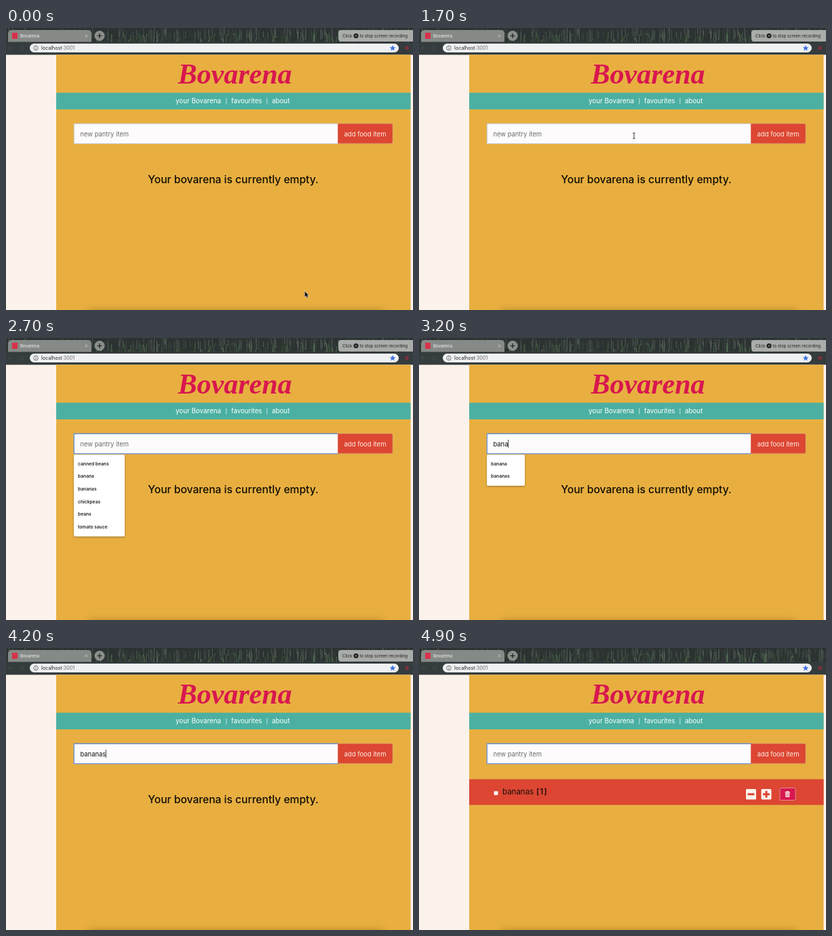
An HTML page with a canvas for the animation above (5000 ms loop, 600 by 416 pixels).

```html
<!DOCTYPE html>
<html lang="en">
<head>
<meta charset="utf-8">
<title>Bovarena</title>
<style>
  html, body { margin: 0; width: 100%; height: 100%; overflow: hidden; }
  canvas { display: block; width: 600px; height: 416px; }
</style>
</head>
<body>
<canvas id="stage"></canvas>
<script>
const W = 600, H = 416, LOOP = 5000, STEP = 100;
const RED = '#dc4632', CRIMSON = '#d8174f', ORANGE = '#e8af40', TEAL = '#4bb0a2', CREAM = '#fcf2ec';
const SANS = 'Inter, sans-serif';

const canvas = document.getElementById('stage');
const ctx = canvas.getContext('2d');
const dpr = window.devicePixelRatio || 1;
canvas.width = W * dpr;
canvas.height = H * dpr;
ctx.scale(dpr, dpr);

// Times at which the value of the input field changes
const typing = [[0, ''], [2800, 'b'], [2900, 'ba'], [3000, 'bana'],
  [3500, 'banan'], [3700, 'banana'], [3900, 'bananas'], [4300, '']];
const history = ['canned beans', 'banana', 'bananas', 'chickpeas', 'beans', 'tomato sauce'];
const FOCUS = 1800, CURSOR_HIDDEN = 2000, LIST_CLOSED = 4000, ADDED = 4300;
const HINT_FADE = 4300, HINT_GONE = 4700;

function rect(x, y, w, h, fill, radius = 0) {
  ctx.fillStyle = fill;
  ctx.beginPath();
  ctx.roundRect(x, y, w, h, radius);
  ctx.fill();
}

function outline(x, y, w, h, color, width = 1, radius = 0) {
  ctx.strokeStyle = color;
  ctx.lineWidth = width;
  ctx.beginPath();
  ctx.roundRect(x, y, w, h, radius);
  ctx.stroke();
}

function disc(x, y, r, fill) {
  ctx.fillStyle = fill;
  ctx.beginPath();
  ctx.arc(x, y, r, 0, 7);
  ctx.fill();
}

function lines(color, width, ...segments) {
  ctx.strokeStyle = color;
  ctx.lineWidth = width;
  ctx.beginPath();
  for (const [x1, y1, x2, y2] of segments) {
    ctx.moveTo(x1, y1);
    ctx.lineTo(x2, y2);
  }
  ctx.stroke();
}

function text(str, x, y, size, color, weight = 400, align = 'left') {
  ctx.font = `${weight} ${size}px ${SANS}`;
  ctx.fillStyle = color;
  ctx.textAlign = align;
  ctx.fillText(str, x, y);
  return ctx.measureText(str).width;
}

function cross(x, y, r, color, width) {
  lines(color, width, [x - r, y - r, x + r, y + r], [x - r, y + r, x + r, y - r]);
}

function withShadow(color, blur, offsetY, paint) {
  ctx.save();
  ctx.shadowColor = color;
  ctx.shadowBlur = blur * dpr;
  ctx.shadowOffsetY = offsetY * dpr;
  paint();
  ctx.restore();
}

function rainyTheme() {
  let seed = 11;
  const rnd = () => (seed = seed * 16807 % 2147483647) / 2147483647;
  rect(0, 0, W, 40, '#2b3231');
  for (let i = 0; i < 190; i++) {
    const x = rnd() * W, y = rnd() * 8 - 2;
    lines(`rgba(150,162,154,${0.1 + rnd() * 0.35})`, 0.9, [x, y, x, y + 8 + rnd() * 12]);
  }
  for (let i = 0; i < 150; i++) {
    const x = rnd() * W, h = 4 + rnd() * 13, lean = (rnd() - 0.5) * 11;
    ctx.strokeStyle = `hsla(${100 + rnd() * 40},${8 + rnd() * 14}%,${18 + rnd() * 26}%,.8)`;
    ctx.lineWidth = 0.7 + rnd();
    ctx.beginPath();
    ctx.moveTo(x, 21);
    ctx.quadraticCurveTo(x, 21 - h, x + lean, 21 - h * 0.8);
    ctx.stroke();
  }
}

function star(x, y, r, color) {
  ctx.fillStyle = color;
  ctx.beginPath();
  for (let i = 0; i < 10; i++) {
    const a = i * Math.PI / 5 - Math.PI / 2, d = i % 2 ? r * 0.45 : r;
    ctx.lineTo(x + d * Math.cos(a), y + d * Math.sin(a));
  }
  ctx.fill();
}

function recordingHint(t) {
  if (t >= HINT_GONE) return;
  ctx.globalAlpha = 1 - Math.max(0, t - HINT_FADE) / (HINT_GONE - HINT_FADE);
  rect(490, 3, 114, 17, '#a9aca9', 4);
  text('Click', 496, 14, 6.2, '#222');
  disc(516, 11.5, 3.6, '#1c1c1c');
  cross(516, 11.5, 1.2, '#c9cbc9', 0.8);
  text('to stop screen recording', 521.5, 14, 6.1, '#222');
  ctx.globalAlpha = 1;
}

function browser(t) {
  rainyTheme();
  rect(3, 3, 123, 18, '#868a87', [5, 5, 0, 0]);
  rect(9, 7, 8, 9, '#d8324a');
  text('Bovarena', 21, 14, 6.3, '#f5f5f5');
  cross(118.5, 11.5, 1.8, '#d0d2d0', 0.8);
  disc(138, 11.5, 7.5, '#8b8f8b');
  lines('#171a1a', 1.2, [134.5, 11.5, 141.5, 11.5], [138, 8, 138, 15]);
  recordingHint(t);

  rect(0, 20.5, W, 19, '#353c3e');
  lines('#434b4d', 1, [4, 29.5, 10, 29.5], [4, 29.5, 7, 26.5], [4, 29.5, 7, 32.5]);
  outline(20, 27, 6, 6, '#434b4d', 1, 3);
  rect(35, 23, 544, 13, '#eff1f3', 6.5);
  outline(40.7, 26.3, 6.6, 6.6, '#555', 0.8, 3.3);
  lines('#555', 0.9, [44, 29, 44, 31.5], [44, 27.5, 44, 28.3]);
  const w = text('localhost', 52, 32.2, 7.2, '#222');
  text(':3001', 52 + w, 32.2, 7.2, '#666');
  star(570, 29.8, 4.6, '#3f73e0');
  disc(591, 29.5, 3, '#76333f');
}

function page() {
  rect(0, 39.5, W, H, CREAM);
  rect(74, 39.5, 522.5, H, ORANGE);
  ctx.font = 'italic 700 42px "Liberation Serif", serif';
  ctx.fillStyle = CRIMSON;
  ctx.textAlign = 'center';
  ctx.fillText('Bovarena', 337.5, 82);

  rect(74, 95.5, 522.5, 24.5, TEAL);
  text('your Bovarena', 250, 111, 9.8, '#fff');
  text('favourites', 332, 111, 9.7, '#fff');
  text('about', 392, 111, 9.8, '#fff');
  lines('#e3f1ed', 0.8, [324.8, 103.5, 324.8, 112.5], [384.8, 103.5, 384.8, 112.5]);

  withShadow('rgba(110,70,0,.45)', 12, 0, () => rect(122, H + 1, 434, 20, ORANGE));
}

function form(t, value) {
  const focused = t >= FOCUS;
  rect(100, 141, 389, 30, '#fdfbfc');
  outline(100.3, 141.2, 389.5, 29.4, focused ? '#6f97e2' : '#c3ccd0', focused ? 1.4 : 1);
  if (focused) lines('#8b94a4', 1, [100, 141, 489, 141]);
  rect(489, 141, 81, 29.5, RED, [0, 2, 2, 0]);
  outline(489.3, 141, 80.7, 29.3, '#d9a283', 0.6, [0, 2, 2, 0]);
  text('add food item', 529.5, 159.7, 9.5, '#fdeee6', 400, 'center');

  const width = value
    ? text(value, 109.5, 159.7, 9.4, '#111')
    : (text('new pantry item', 109.5, 159.7, 9.4, '#6c6c6c'), 0);
  const lastEdit = typing.filter(([at]) => at <= t && at).pop();
  const since = t - (lastEdit ? lastEdit[0] : FOCUS);
  const caretOn = value || since % 1000 < 500;
  if (focused && caretOn) lines('#222', 0.8, [109.7 + width, 150, 109.7 + width, 162]);
}

function suggestions(t, value) {
  if (t < FOCUS || t >= LIST_CLOSED) return;
  const items = history.filter(item => item.startsWith(value));
  const width = value ? 56 : 75, height = 8.6 + items.length * 18.7;
  withShadow('rgba(0,0,0,.35)', 3, 1, () => rect(100, 172, width, height, '#fff', 2));
  items.forEach((item, i) => text(item, 106, 187.6 + i * 18.7, 6.7, '#222', 600));
}

function pantryRow() {
  rect(74, 193.5, 522.5, 38, RED);
  rect(110.6, 211.3, 5.8, 5.8, '#fff', 1);
  text('bananas', 123, 216.3, 11.5, '#1c0f0c');
  ctx.letterSpacing = '1px';
  text('[1]', 173, 216.3, 11.4, '#1c0f0c', 600);
  ctx.letterSpacing = '0px';
  rect(482, 208, 15, 15.5, CREAM, 1.5);
  rect(504.5, 208, 15, 15.5, CREAM, 1.5);
  lines(RED, 3, [484.5, 215.8, 494.5, 215.8], [507, 215.8, 517, 215.8], [512, 210.8, 512, 220.8]);

  rect(532, 206.5, 23, 18, CRIMSON, 2);
  outline(532, 206.5, 23, 18, '#e9a3a8', 0.8, 2);
  rect(539.5, 212, 7.5, 1.3, CREAM);
  rect(542, 211, 2.5, 1.2, CREAM);
  rect(540.2, 213.8, 6.1, 6.2, CREAM, [0, 0, 1, 1]);
  lines(CRIMSON, 0.6, ...[541.7, 543.25, 544.8].map(x => [x, 214.8, x, 219]));
}

function arrow(x, y) {
  ctx.beginPath();
  [[0, 0], [0, 8.2], [1.9, 6.5], [3.2, 9.4], [4.6, 8.8], [3.3, 6], [5.8, 6]]
    .forEach(([dx, dy]) => ctx.lineTo(x + dx, y + dy));
  ctx.closePath();
  ctx.fillStyle = '#111';
  ctx.strokeStyle = '#fff';
  ctx.lineWidth = 1;
  ctx.stroke();
  ctx.fill();
}

function iBeam(x, y) {
  lines('#222', 0.9, [x, y - 3.5, x, y + 3.5], [x - 1.8, y - 4, x + 1.8, y - 4], [x - 1.8, y + 4, x + 1.8, y + 4]);
}

function pointer(t) {
  if (t >= CURSOR_HIDDEN) return;
  const p = Math.min(t / 900, 1), ease = p * p * (3 - 2 * p);
  const x = 440.5 + (317 - 440.5) * ease, y = 388.5 + (159 - 388.5) * ease;
  const overText = y < 171 || (y > 214 && y < 233);
  (overText ? iBeam : arrow)(x, y);
}

function draw(now) {
  const t = Math.floor(now % LOOP / STEP) * STEP;
  const value = typing.filter(([at]) => at <= t).pop()[1];
  browser(t);
  page();
  form(t, value);
  if (t >= ADDED) pantryRow();
  else text('Your bovarena is currently empty.', 335, 229, 15.6, '#100c05', 500, 'center');
  suggestions(t, value);
  pointer(t);
}

const start = performance.now();
function loop() {
  draw(performance.now() - start);
  requestAnimationFrame(loop);
}
loop();
</script>
</body>
</html>
```
